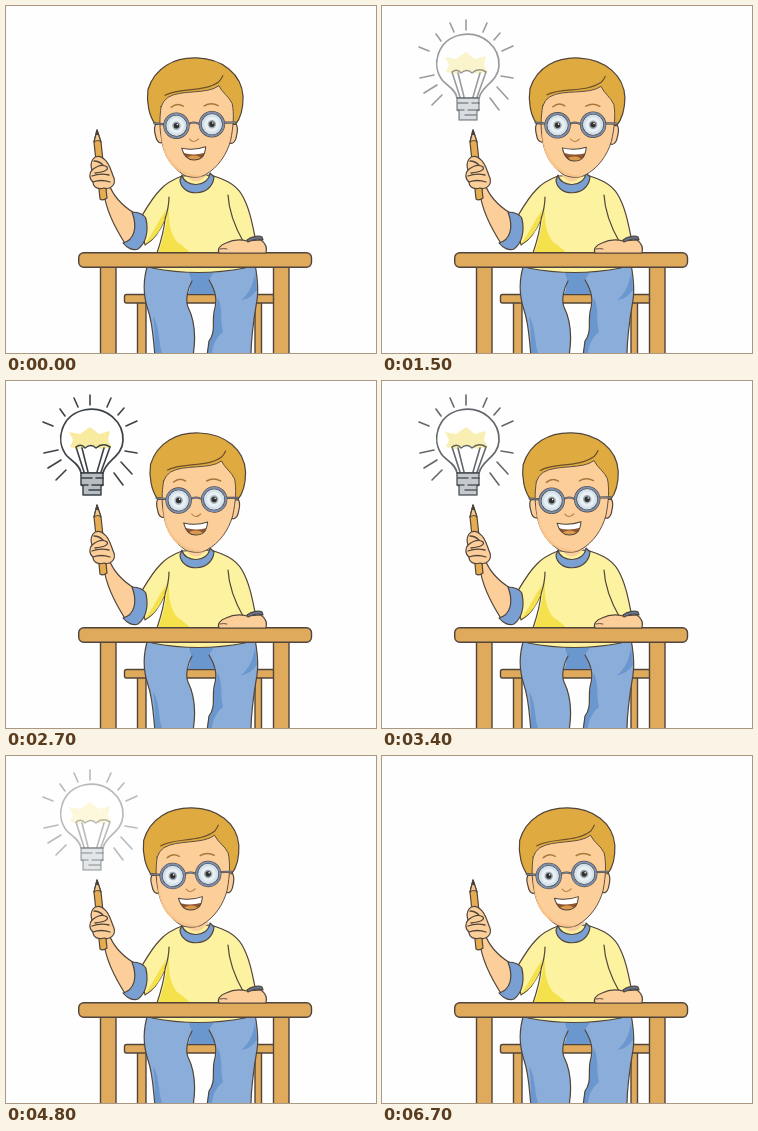
These frames come from a looping animation (370x347 px, 7 s). An HTML page with a canvas:

```html
<!DOCTYPE html>
<html lang="en">
<head>
<meta charset="utf-8">
<title>Bright idea</title>
<style>
  html, body { margin: 0; width: 100%; height: 100%; overflow: hidden; background: #fefefe; }
  canvas { display: block; width: 370px; height: 347px; }
</style>
</head>
<body>
<canvas id="stage" width="370" height="347"></canvas>
<script>
const ctx = document.getElementById('stage').getContext('2d');
const LOOP = 7000, STEP = 100, LAST = 6700;
const LINE = '#51453b', WOOD = '#dfaa5c', HAIR = '#dfab40', SKIN = '#fccf9a',
      SHADE = '#f9c48b', SHIRT = '#fcf29f', GOLD = '#f4e14c', BLUE = '#6b97cf', JEANS = '#8badd9',
      CUFF = '#7a9fd3', RIM = '#7d8fae';

// Keys are [time, value] pairs, joined by straight ramps.
const BULB = [[0, 0], [700, .23], [1500, .5], [2800, 1], [4100, .5], [5500, .2], [6400, .06], [6500, 0], [LOOP, 0]];
const SWAY = [[0, -.7], [1500, .7], [2000, .7], [4100, -1.7], [LOOP, -1.7]];
const JAW = [[0, 0], [700, 2], [1500, 1], [2700, 0], [LOOP, 0]];

function valueAt(keys, t) {
  const i = keys.findIndex(k => k[0] > t);
  const [t0, a] = keys[i - 1], [t1, b] = keys[i];
  return a + (b - a) * (t - t0) / (t1 - t0);
}

function shape(d, fill, stroke = LINE, width = 1.2) {
  const path = new Path2D(d);
  if (fill) { ctx.fillStyle = fill; ctx.fill(path); }
  if (stroke) { ctx.strokeStyle = stroke; ctx.lineWidth = width; ctx.stroke(path); }
}

const line = (d, color = LINE, width = 1.2) => shape(d, null, color, width);

function box(x, y, w, h, r) {
  ctx.beginPath();
  ctx.roundRect(x, y, w, h, r);
  ctx.fillStyle = WOOD;
  ctx.fill();
  ctx.strokeStyle = LINE;
  ctx.lineWidth = 1.4;
  ctx.stroke();
}

function disc(x, y, r, fill, stroke, width = 1) {
  ctx.beginPath();
  ctx.arc(x, y, r, 0, Math.PI * 2);
  if (fill) { ctx.fillStyle = fill; ctx.fill(); }
  if (stroke) { ctx.strokeStyle = stroke; ctx.lineWidth = width; ctx.stroke(); }
}

function drawStool() {
  box(131.5, 296, 8.5, 60, 0);
  box(249, 296, 6.5, 60, 0);
  box(118.5, 288.5, 150, 8.5, 2);
}

function drawJeans() {
  shape('M180 262H213C213 273 211 281 208 288H182C186 280 185 271 180 262Z', BLUE, null);
  shape('M142 258C137 273 137 289 142 304C147 318 147 332 149 350H187C190 332 189 315 182 301' +
        'C179 294 182 282 186 275L178 258Z', JEANS, null);
  shape('M213 258L203 274C209 284 212 293 208 306C206 317 210 326 203 335L201 350H245' +
        'C245 328 248 312 251 294C253 281 251 269 249 258Z', JEANS, null);
  shape('M147 310C154 322 152 334 156 347H149C149 334 149 322 147 310Z' +
        'M212 292C217 302 214 315 217 326C212 330 207 337 206 347H201L203 335C210 326 206 316 209 306Z' +
        'M249 266C247 281 241 290 235 294C243 293 247 289 251 284Z', BLUE, null);
  line('M142 258C137 273 137 289 142 304C147 318 147 332 149 350M249 258C251 269 253 281 251 294C248 312 245 328 245 350');
  line('M187 350C190 332 189 315 182 301C179 294 182 282 186 275M201 350L203 335C210 326 206 317 208 306C212 293 209 284 203 274');
}

function drawShirt() {
  shape('M176 170C168 173 160 177 154 184C146 192 140 203 134 213L139 239C148 234 154 225 159 213' +
        'C158 226 154 238 151 247L146 262Q192 271 239 262L240 236L249 231C246 216 243 201 236 189C229 177 217 173 205 169Z', SHIRT);
  shape('M162 198C164 211 161 222 171 236C177 240 182 244 184 247H152C158 233 161 217 162 198Z' +
        'M139 238C147 227 153 214 160 204L159 213C154 225 148 234 139 238Z', GOLD, null);
  line('M163 191C163 197 161 207 159 213M222 189C223 208 230 223 238 237');
  shape('M179 168Q190 184 203 166Z', SKIN, null);
  shape('M176 169C179 182 202 182 204 167L208 171C206 192 175 191 174 174Z', CUFF);
}

function drawRaisedArm() {
  shape('M103 178C107 190 117 200 128 207L132 225L120 239C109 222 100 205 98 187Z', SKIN);
  shape('M126 206C133 206 139 209 140 213C143 227 139 238 132 243C127 245 121 242 117 237C128 234 132 222 126 206Z', CUFF);

  // Pencil
  shape('M88 136L91 124L95 136L101 192Q97 195 94 193Z', '#e5ad50');
  shape('M88 136L91 124L95 136Q92 133 88 136Z', '#f3ca8a');
  shape('M90 129L91 123L93 129Z', '#44403b', null);

  // Fist
  shape('M87 153C90 149 95 150 98 153C104 157 105 166 108 172C110 179 104 184 98 182' +
        'C92 184 87 181 87 176C83 173 83 167 86 164C84 159 85 156 87 153Z', SKIN);
  line('M86 164C91 160 97 158 101 161C103 164 98 166 89 167M86 170Q94 167 103 169M87 176Q95 173 104 176M88 155Q93 155 97 159', LINE, 1.3);
}

function drawTable() {
  box(94.5, 256, 15.5, 100, 0);
  box(267.5, 256, 15.5, 100, 0);
  box(72.7, 246.7, 232.8, 14.5, 5);
}

function drawRestingArm() {
  shape('M241 235C234 233 226 234 220 237C214 239 211 243 213 247H260Q262 239 255 234Z', SKIN);
  line('M214 243Q218 242 221 243', LINE, .9);
  shape('M241 234C245 231 252 229 256 231L257 234C250 232 246 234 242 236Z', '#65799a');
}

function drawLens(x, y) {
  disc(x, y, 11.7, '#d3e1ec', LINE, 3);
  disc(x, y, 11.7, null, RIM, 1.9);
  disc(x, y, 7.6, '#e8f0f4');
  disc(x, y, 4.2, '#9cabb4');
  disc(x, y, 2.7, '#34302e');
  disc(x + 1, y - 1.2, .8, '#fff');
}

function drawMouth(jaw) {
  const low = 154 + jaw;
  const mouth = `M178 142Q190 145 202 141C201 ${low - 3} 197 ${low} 190 ${low}C184 ${low} 180 ${low - 4} 178 142Z`;
  ctx.save();
  ctx.clip(new Path2D(mouth));
  shape(mouth, '#8f552f', null);
  shape('M177 140H204L201 147Q190 150 180 147Z', '#fff', null);
  ctx.beginPath();
  ctx.ellipse(190, low, 8, 4.5, 0, 0, Math.PI * 2);
  ctx.fillStyle = '#d99a4d';
  ctx.fill();
  ctx.restore();
  line(mouth, LINE, 1);
}

function drawHead(sway, jaw) {
  ctx.save();
  ctx.translate(189 + sway * 2.5, 187);
  ctx.rotate(sway * Math.PI / 180);
  ctx.translate(-189, -187);

  shape('M157 117C151 115 150 122 152 129C153 136 157 138 160 135Z', SKIN);
  shape('M227 117C234 115 235 123 233 130C232 137 228 140 224 136Z', SKIN);
  shape('M152 118C146 110 143 96 145 83C152 61 172 51 194 52C220 53 239 69 240 91C240 103 237 113 232 119Z', HAIR);
  shape('M158 100C156 112 156 122 158 133C160 150 169 162 180 169C186 172 196 172 201 169' +
        'C214 162 223 149 227 135C230 121 231 108 229 98C226 91 219 87 216 80C204 89 178 83 165 91Q160 94 158 100Z', SKIN, LINE, .9);
  shape('M158 112C158 133 160 149 174 161C180 167 190 169 199 170C187 173 174 166 168 159C157 146 157 128 158 112Z', SHADE, null);
  line('M162 89C176 81 201 87 216 76Q219 73 220 70', '#6c502b');

  line('M168 101Q174 96 180 100M201 100Q208 96 215 100', '#a8763c', 1.5);
  const frame = 'M161 118L151 117M220 117L232 117M185 118Q190 115 196 118';
  line(frame, LINE, 2.2);
  line(frame, RIM, .9);
  drawLens(173, 119.5);
  drawLens(208.5, 118.5);
  line('M186 133Q190 138 195 133', '#b87b45', 1.1);
  drawMouth(jaw);
  ctx.restore();
}

function drawBulb(alpha) {
  if (alpha <= 0) return;
  const ink = '#363b40';
  ctx.save();
  ctx.globalAlpha = alpha;
  line('M84 14V24M68 17L72 26M105 17L101 26M54 28L59 35M118 27L112 34M37 41L47 45' +
       'M131 40L120 45M38 72L52 69M119 70L131 72M42 87L55 79M115 81L126 93M50 99L60 89M108 92L117 104', ink, 1.6);
  shape('M75 92C74 84 66 80 61 75C48 59 56 34 78 29C101 24 118 42 117 60C116 76 100 79 97 92Z', '#fff', ink, 1.7);
  shape('M64 66L67 59L63 51L74 53L84 46L93 53L104 50L102 59L106 66L95 68Q85 62 74 68Z', '#f8eb9c', null);
  line('M78 91L70 66Q75 62 79 67Q85 62 90 67Q97 61 104 66L95 91M76 67L82 91M98 67L91 91', ink, 1.6);
  shape('M75 92H97V104L95 105V114H77V105L75 104Z', '#b3bac1', ink, 1.5);
  line('M76 97H86M90 97H97M76 104H82M86 104H97M83 109H94', ink, 1.5);
  ctx.restore();
}

function draw(t) {
  ctx.fillStyle = '#fefefe';
  ctx.fillRect(0, 0, 370, 347);
  drawStool();
  drawJeans();
  drawShirt();
  drawRaisedArm();
  drawTable();
  drawRestingArm();
  drawHead(valueAt(SWAY, t), valueAt(JAW, t));
  drawBulb(valueAt(BULB, t));
}

ctx.lineJoin = ctx.lineCap = 'round';
const start = performance.now();

function tick() {
  const time = (performance.now() - start) % LOOP;
  draw(Math.min(Math.floor(time / STEP) * STEP, LAST));
  requestAnimationFrame(tick);
}
tick();
</script>
</body>
</html>
```
